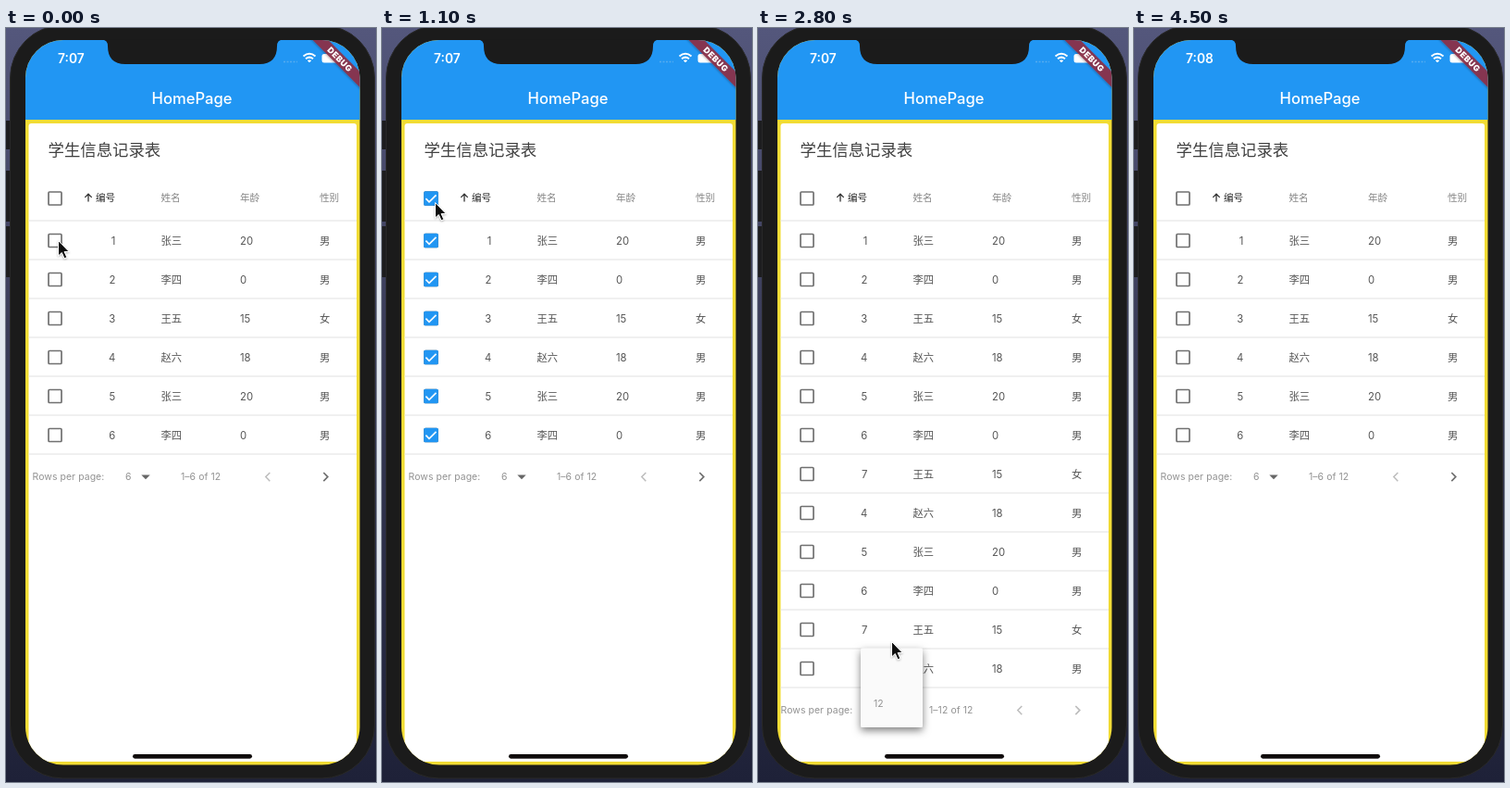
Write an HTML page that moves like this. It is 400x814 px and loops after 4.6 s.

```html
<!DOCTYPE html>
<html lang="zh-CN">
<head>
<meta charset="utf-8">
<style>
html, body { margin: 0; width: 100%; height: 100%; overflow: hidden; background: #30324a; }
svg { display: block; width: 100%; height: 100%; }
text { font-family: Inter, "Noto Sans CJK SC", "Noto Sans CJK", sans-serif; fill: #555; font-size: 11.3px; }
.head text { font-size: 10.6px; fill: #858585; }
.foot { font-size: 10.4px; fill: #929292; letter-spacing: .1px; }
</style>
</head>
<body>
<svg viewBox="0 0 400 814">
  <defs>
    <clipPath id="screen"><rect x="21" y="13" width="361.5" height="782.5" rx="41"/></clipPath>
    <linearGradient id="wall" x2="0" y2="1">
      <stop stop-color="#54577c"/>
      <stop offset=".4" stop-color="#3a3c58"/>
      <stop offset="1" stop-color="#1e2138"/>
    </linearGradient>
    <filter id="shadow" x="-30%" y="-30%" width="160%" height="160%">
      <feDropShadow dx="0" dy="3.500" stdDeviation="4.500" flood-opacity=".5"/>
    </filter>
    <filter id="soft" x="-50%" y="-50%" width="200%" height="200%">
      <feDropShadow dx="0" dy="1" stdDeviation="1" flood-opacity=".3"/>
    </filter>
  </defs>
  <rect width="400" height="814" fill="url(#wall)"/>
  <path d="M0 100h6v31H0zM0 154h6v55H0zM0 214h6v55H0z" fill="#1d1d1f"/>
  <rect x="4.500" y="-3" width="394" height="813" rx="57" fill="#1b1b1b" stroke="#292929"/>
  <g clip-path="url(#screen)">
    <rect x="21" y="13" width="362" height="783" fill="#f2dc34"/>
    <rect x="21" y="13" width="362" height="86" fill="#2196f3"/>
    <rect x="24.500" y="103" width="354.500" height="689" rx="3" fill="#fff"/>
    <text id="clock" x="56" y="37.500" style="fill:#fff;font-size:13.800px;font-weight:600"></text>
    <g fill="none" stroke="#fff" stroke-width="2">
      <path d="M321.500 30.500q6.500 -5.500 13 0M324 33.300q4 -3.300 8 0"/>
      <path d="M326.500 35h3L328 37z" fill="#fff" stroke-width="1"/>
    </g>
    <path d="M300 36.500h15" stroke="#55abf0" stroke-width="1.500" stroke-dasharray="2 1.500"/>
    <rect x="341.500" y="28" width="20" height="9.500" rx="2.500" fill="#fff"/>
    <text x="201" y="82" text-anchor="middle" style="fill:#fff;font-size:16.600px;font-weight:500">HomePage</text>
    <g transform="translate(361 34) rotate(45)">
      <rect x="-45" y="-6" width="90" height="12" fill="#8c3048" fill-opacity=".92" filter="url(#soft)"/>
      <text y="3.200" text-anchor="middle" style="fill:#fff;font-size:9px;font-weight:900;letter-spacing:.5px">DEBUG</text>
    </g>
    <text x="45.500" y="138" style="font-size:17.400px;fill:#404040">学生信息记录表</text>
    <path d="M89 187.500v-8M85.300 182.900l3.700 -3.700l3.700 3.700" fill="none" stroke="#333" stroke-width="1.300"/>
    <g class="head" id="heads"></g>
    <g id="table"></g>
    <g id="footer">
      <text class="foot" id="perPage" y="488.300">Rows per page:</text>
      <text class="foot" id="size" y="488.300"></text>
      <path id="drop" d="M-4.700 482.500h9.400l-4.700 4.700z" fill="#666"/>
      <text class="foot" id="range" y="488.300"></text>
      <path d="M285.300 480l-4.500 4.600l4.500 4.600" fill="none" stroke="#bdbdbd" stroke-width="1.500"/>
      <path id="next" d="M343.300 480l4.500 4.600l-4.500 4.600" fill="none" stroke-width="1.700"/>
    </g>
    <g id="menu">
      <rect id="sheet" width="67" rx="2" fill="#fafafa" filter="url(#shadow)"/>
      <text class="foot" id="six">6</text>
      <text class="foot" id="twelve">12</text>
    </g>
  </g>
  <path d="M104 12.500q6 .5 6 7q0 19.500 19 19.500h145q19 0 19 -19.500q0 -6.500 6 -7z" fill="#1b1b1b"/>
  <rect x="137" y="784" width="129" height="4.700" rx="2.350" fill="#100c0c"/>
  <path id="cursor" d="M0 0V16.500L3.800 13L6.600 19.300L9.300 18.100L6.600 12H11.700z" fill="#0c0c0c" stroke="#fff" stroke-width="1" stroke-linejoin="round" filter="url(#soft)"/>
</svg>
<script>
const LOOP = 4600, STEP = 100, ROW = 42, TOP = 229.5;
const el = id => document.getElementById(id);
const clamp = v => Math.max(0, Math.min(1, v));
const ramp = (t, start, length) => clamp((t - start) / length);
const set = (node, attrs) => { for (const k in attrs) node.setAttribute(k, attrs[k]); };

function make(parent, tag, attrs, content = '') {
  const node = document.createElementNS('http://www.w3.org/2000/svg', tag);
  set(node, attrs);
  node.textContent = content;
  return parent.appendChild(node);
}

function makeCheckbox(parent, y) {
  const g = make(parent, 'g', { transform: `translate(53 ${y})` });
  make(g, 'rect', { x: -7, y: -7, width: 14, height: 14, rx: 1, fill: '#fff', stroke: '#707070', 'stroke-width': 1.7 });
  const fill = make(g, 'rect', { x: -7.8, y: -7.8, width: 15.6, height: 15.6, rx: 1.5, fill: '#2196f3' });
  const tick = make(g, 'path', {
    d: 'M-5.600 .2L-2 3.800L5.500 -3.700', fill: 'none', stroke: '#fff', 'stroke-width': 1.7,
    pathLength: 1, 'stroke-dasharray': '1 2'
  });
  return p => {
    set(fill, { opacity: clamp(p * 2) });
    set(tick, { 'stroke-dashoffset': 1 - clamp((p - .3) / .7), opacity: p > .3 ? 1 : 0 });
  };
}

const people = [['张三', 20, '男'], ['李四', 0, '男'], ['王五', 15, '女'], ['赵六', 18, '男']];
const columns = [167.5, 253, 339];

make(el('heads'), 'text', { x: 97, y: 187, style: 'fill:#2c2c2c;font-weight:500' }, '编号');
['姓名', '年龄', '性别'].forEach((label, i) => make(el('heads'), 'text', { x: columns[i], y: 187 }, label));

const checkAll = makeCheckbox(el('heads'), 184);
make(el('table'), 'path', { d: 'M24.500 208H379', stroke: '#e2e2e2', 'stroke-width': 1.2 });

const rows = Array.from({ length: 12 }, (_, i) => {
  const y = TOP + i * ROW;
  const group = make(el('table'), 'g', {});
  const id = i < 7 ? i + 1 : 4 + (i - 7) % 4;
  make(group, 'text', { x: 118.3, y: y + 4, 'text-anchor': 'end' }, id);
  people[i % 4].forEach((value, c) => make(group, 'text', { x: columns[c], y: y + 4 }, value));
  make(group, 'path', { d: `M24.500 ${y + 20.5}H379`, stroke: '#e2e2e2', 'stroke-width': 1.2 });
  return { group, check: makeCheckbox(group, y) };
});

// time, x, y of the pointer tip
const path = [
  [0, 56.5, 229.5], [600, 56.5, 229.5], [900, 57.5, 188.5], [1400, 57.5, 188.5],
  [1600, 150, 486], [1800, 149, 507], [2000, 140, 524], [2100, 140, 524],
  [2500, 146, 734], [2600, 146, 734], [2800, 144.5, 662.5], [3000, 140, 684],
  [3200, 140, 684], [3600, 314, 460.5], [3900, 402, 380]
];

function pointer(t) {
  let i = 1;
  while (i < path.length - 1 && t > path[i][0]) i++;
  const [t0, x0, y0] = path[i - 1], [t1, x1, y1] = path[i];
  const p = ramp(t, t0, t1 - t0), e = p * p * (3 - 2 * p);
  return [x0 + (x1 - x0) * e, y0 + (y1 - y0) * e];
}

function drawMenu(t) {
  const second = t >= 2300;
  const [opens, closes] = second ? [2600, 3000] : [1600, 2000];
  const opacity = ramp(t, opens, 100) * (1 - ramp(t, closes, 150));
  const grow = ramp(t, opens + 50, second ? 190 : 150);
  const x = second ? 111 : 115, top = second ? 658 : 457;
  const height = 42 + 55 * grow;
  set(el('menu'), { opacity });
  set(el('sheet'), { x, y: second ? 755 - height : top, height });
  set(el('six'), { x: x + 14, y: top + 31.3, opacity: second ? ramp(t, 2800, 100) : 1 });
  set(el('twelve'), { x: x + 14, y: top + (second ? 75.3 : 73.3), opacity: second ? 1 : ramp(t, 1650, 100) });
}

function draw(t) {
  const long = t >= 2100 && t < 3100;
  const all = ramp(t, 980, 120) * (1 - ramp(t, 1380, 200));
  const first = ramp(t, 380, 200) * (1 - ramp(t, 1380, 200));
  checkAll(all);
  rows.forEach((row, i) => {
    set(row.group, { visibility: i < 6 || long ? 'visible' : 'hidden' });
    row.check(i ? all : first);
  });

  const shift = long ? -4 : 0;
  set(el('footer'), { transform: `translate(0 ${long ? 6 * ROW : 0})` });
  set(el('perPage'), { x: 28.5 + shift });
  set(el('size'), { x: 129 + shift });
  set(el('drop'), { transform: `translate(${151 + shift} 0)` });
  set(el('range'), { x: 189 + shift });
  set(el('next'), { stroke: long ? '#bdbdbd' : '#707070' });
  el('size').textContent = long ? 12 : 6;
  el('range').textContent = long ? '1–12 of 12' : '1–6 of 12';
  el('clock').textContent = t < 4000 ? '7:07' : '7:08';

  drawMenu(t);
  set(el('cursor'), {
    transform: `translate(${pointer(t).join(' ')})`,
    visibility: t < 3900 ? 'visible' : 'hidden'
  });
}

const start = performance.now();
function tick() {
  const t = (performance.now() - start) % LOOP;
  draw(Math.floor(t / STEP) * STEP);
  requestAnimationFrame(tick);
}
tick();
</script>
</body>
</html>
```
